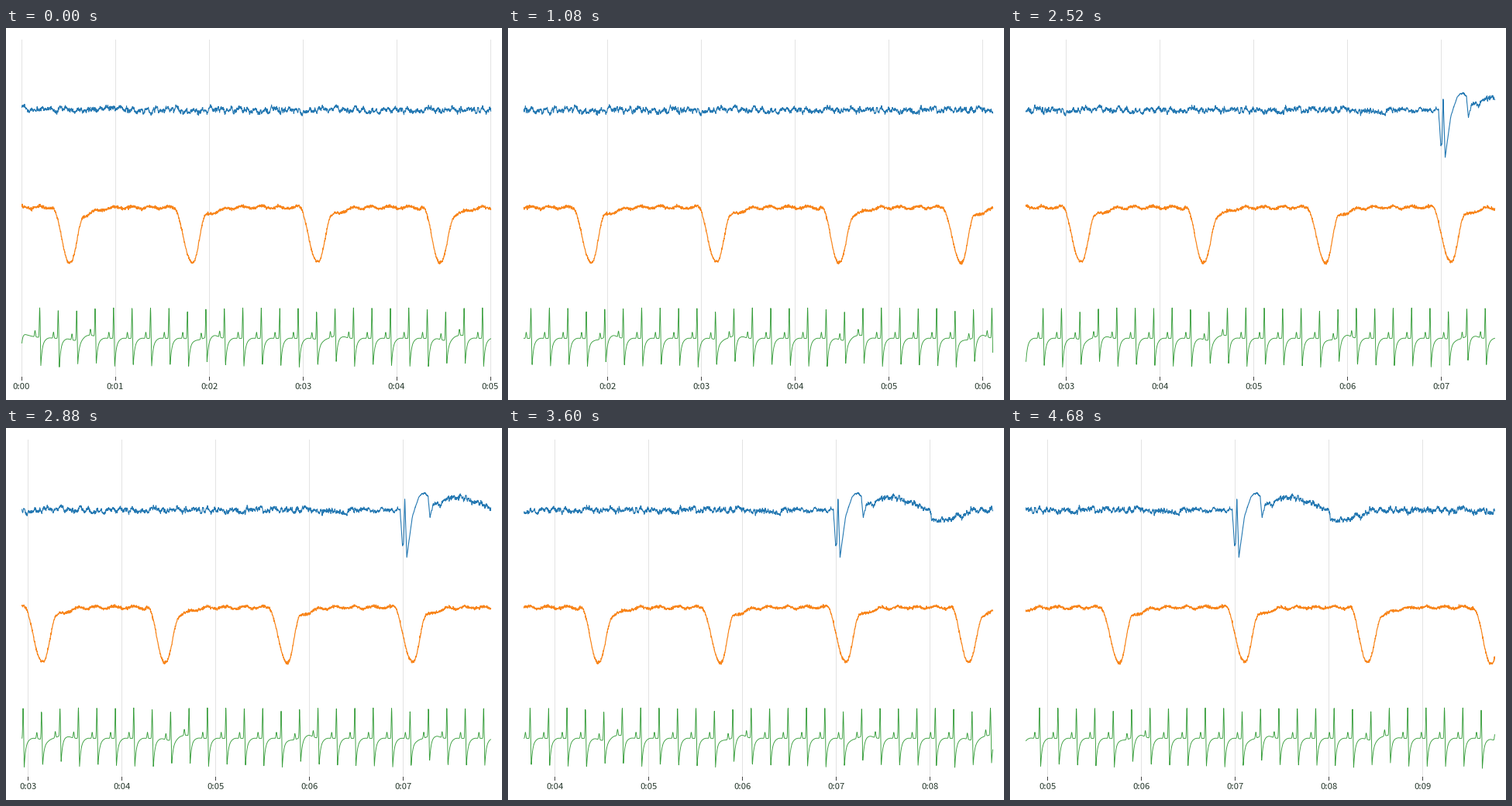
Animation, 640 px wide and 480 px high, one loop 4850 ms. Source, as a matplotlib script:

```python
import numpy as np
import matplotlib.pyplot as plt
from matplotlib.animation import FuncAnimation

W, H, DPI = 640, 480, 100
PX = 72 / DPI                     # one pixel in points
LEFT, SCALE, SPAN = 20, 121, 5    # plot edge, pixels per second, seconds shown
TICK_MS, HOLD_MS, LOOP_MS = 10, 360, 4850
STEP = 1.1 / 3                    # seconds scrolled at each jump
RATE = 500

rng = np.random.default_rng(7)
t = np.arange(0, 9.8, 1 / RATE)
breaths = np.array([0.512, 1.812, 3.150, 4.463, 5.755, 7.094, 8.412, 9.725])
beats = [0.190 + 0.1970 * k - 1.04e-5 * k * k for k in range(51)]


def bump(x, mid, width):
    return np.exp(-((x - mid) / width) ** 2)


def near_breath(x, lag, width):
    return sum(bump(x, d + lag, width) for d in breaths)


def drift_noise(decay):
    kernel = np.exp(-np.arange(40) / decay)
    y = np.convolve(rng.normal(size=t.size + 40), kernel, "same")[:t.size]
    return y / y.std()


def wander(x):
    return (2.5 * near_breath(x, 0.05, 0.07) - 4 * near_breath(x, 0.22, 0.08)
            - 8 * np.exp(-x / 0.1) + 14 * np.exp(-x / 0.012))


def heart():
    y = 400.5 + wander(t)
    for r in beats:
        u = t - r
        late = np.clip(u - 0.012, 0, None)
        peak = 39.5 - 5 * near_breath(r, 0, 0.15) + wander(r)
        dip = 36.5 + 3 * near_breath(r, -0.12, 0.08) - 5 * near_breath(r, 0.08, 0.1)
        tail = 0.82 * np.exp(-late / 0.015) + 0.18 * np.exp(-late / 0.042)
        y += dip * tail * np.clip((u - 0.006) / 0.006, 0, 1)
        y -= 8 * bump(u, -0.05, 0.007) + peak * bump(u, 0, 0.0055)
        y -= 1 * bump(u, 0.1, 0.035)
    return y


def breath():
    y = 231.5 - 1.5 * np.cos(2 * np.pi * (t - beats[0]) / 0.1966)
    for d in breaths:
        x = (t - d) * SCALE
        fall = np.sin(np.pi / 2 * np.clip((x + 23) / 23, 0, 1)) ** 2
        x = np.clip(x - 1, 0, None)
        rise = np.cos(np.pi / 2 * np.clip(x / 17, 0, 1)) ** 2
        y += fall * (56 * rise + 15 * bump(x, 0, 30))
    return y + rng.normal(0, 0.85, t.size) + 0.4 * drift_noise(6)


def brain():
    # the jolt: pixels from the seven-second mark, height
    jolt = [(-4, 106), (-1, 154), (0.4, 150), (2, 90), (4.5, 168), (12, 113),
            (20, 89), (28, 84), (32, 88), (34.5, 114), (38, 99), (75, 88),
            (120, 106), (122.5, 119), (166, 112), (190, 106.5)]
    x, y = zip(*jolt)
    base = np.interp((t - 7) * SCALE, x, y)
    calm = 1 - 0.8 * bump(t, 7.12, 0.2)
    return base + calm * (2.3 * drift_noise(8) + rng.normal(0, 0.8, t.size))


fig = plt.figure(figsize=(W / DPI, H / DPI), dpi=DPI, facecolor="white")
ax = fig.add_axes([0, 0, 1, 1])
ax.set(xlim=(0, W), ylim=(H, 0))
ax.axis("off")

grid, = ax.plot([], [], color="#e3e3e3", lw=PX)
ticks, = ax.plot([], [], color="#444444", lw=PX)
labels = [ax.text(0, 466, "", ha="center", va="baseline", color="#26382c",
                  family="Noto Sans CJK JP", size=11.3 * PX) for _ in range(6)]
traces = [(ax.plot([], [], color=color, lw=width * PX)[0], y)
          for color, width, y in (("#2478b2", 1.1, brain()),
                                  ("#f8851b", 1.2, breath()),
                                  ("#369d3a", 0.9, heart()))]


def bars(xs, top, bottom):
    return np.repeat(xs, 3), np.tile([top, bottom, np.nan], len(xs))


def draw(i):
    start = STEP * (i * TICK_MS // HOLD_MS)
    view = (t >= start - 1e-6) & (t <= start + SPAN + 1e-6)
    x = LEFT + 0.5 + (t[view] - start) * SCALE
    for line, y in traces:
        line.set_data(x, y[view])

    first = int(np.ceil(start - 1e-6))
    secs = np.arange(first, int(np.floor(start + SPAN + 1e-6)) + 1)
    xs = LEFT + (secs - start) * SCALE
    cols = np.floor(xs + 1e-6)
    grid.set_data(*bars(cols, 15, 450))
    ticks.set_data(*bars(cols, 450, 454))
    for n, label in enumerate(labels):
        label.set_visible(n < len(secs))
        if n < len(secs):
            label.set_x(xs[n])
            label.set_text(f"0:{secs[n]:02d}")
    return [grid, ticks, *labels, *(line for line, _ in traces)]


anim = FuncAnimation(fig, draw, frames=LOOP_MS // TICK_MS, interval=TICK_MS,
                     repeat=True, repeat_delay=0, blit=False)
plt.show()
```
